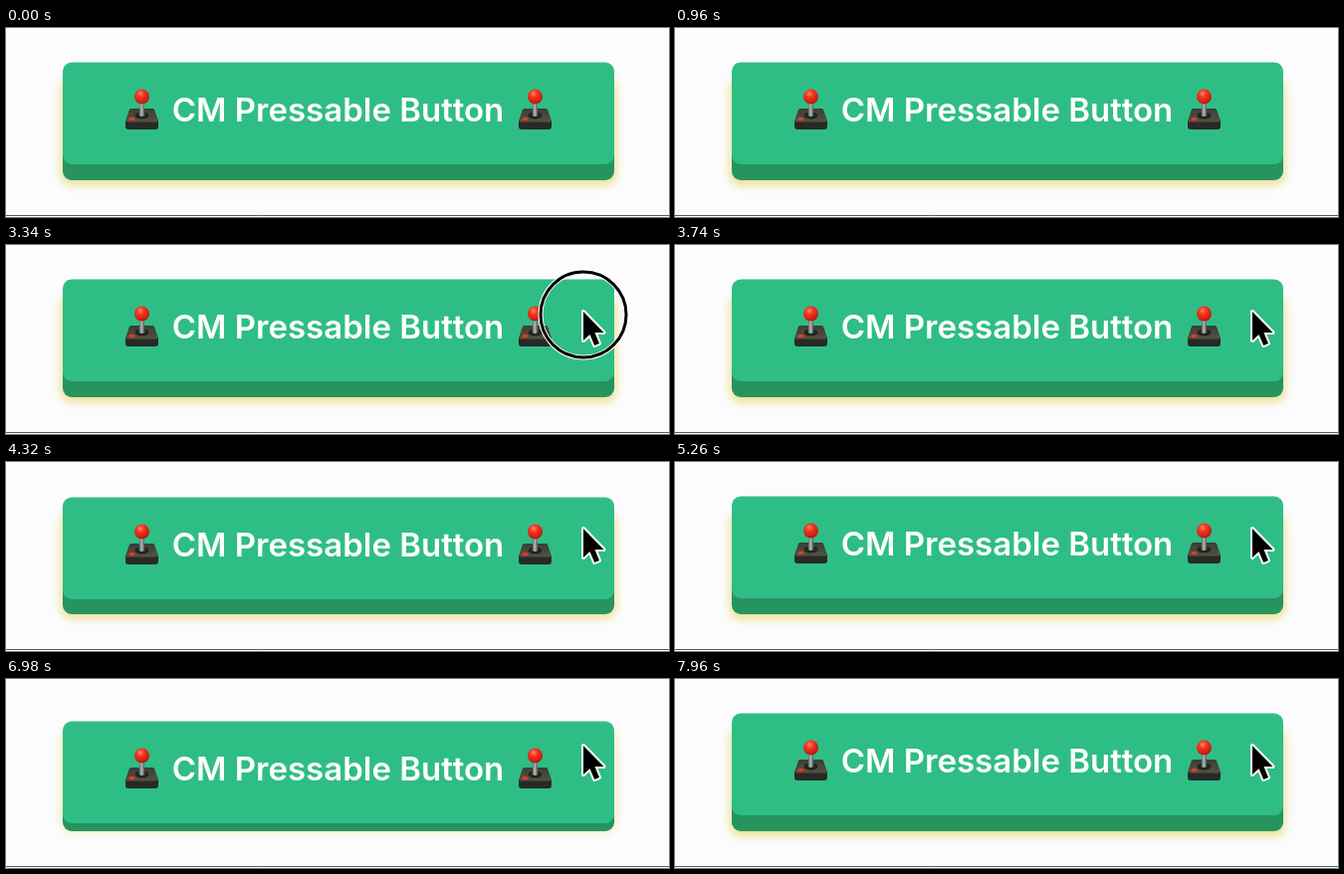
Write an HTML page that moves like this. It is 666 px wide and 190 px high and loops after 8 s.

```html
<!DOCTYPE html>
<html lang="en">
<head>
<meta charset="utf-8">
<title>Pressable button</title>
<style>
  html, body { margin: 0; width: 100%; height: 100%; overflow: hidden; background: #fcfcfe; }
  svg { display: block; width: 666px; height: 190px; }
  text { font: 600 33px Inter, sans-serif; fill: #fff; text-anchor: middle; }
</style>
</head>
<body>
<svg viewBox="0 0 666 190">
  <defs>
    <filter id="blur" x="-10%" y="-30%" width="120%" height="160%"><feGaussianBlur stdDeviation="5"/></filter>
    <radialGradient id="ball" cx=".4" cy=".3" r=".7">
      <stop offset="0" stop-color="#ff8a70"/>
      <stop offset=".35" stop-color="#f8361f"/>
      <stop offset="1" stop-color="#b91710"/>
    </radialGradient>
    <linearGradient id="rod">
      <stop offset="0" stop-color="#4b5151"/>
      <stop offset=".45" stop-color="#b4bcb8"/>
      <stop offset="1" stop-color="#3c4040"/>
    </linearGradient>
    <linearGradient id="deck" x2="0" y2="1">
      <stop offset="0" stop-color="#3a3e35"/>
      <stop offset="1" stop-color="#55533f"/>
    </linearGradient>
    <g id="joystick">
      <path d="M6 20H27Q28.500 20 29 21.500L33 33V38Q33 41 30 41H3Q0 41 0 38V33L4 21.500Q4.500 20 6 20Z" fill="#272a27"/>
      <path d="M6 20H27Q28.500 20 29 21.500L32.500 32Q32.500 33.500 31 33.500H2Q.5 33.500 .5 32L4 21.500Q4.500 20 6 20Z" fill="url(#deck)"/>
      <ellipse cx="16.500" cy="27" rx="7" ry="3.500" fill="#202420"/>
      <path d="M14.700 13H18.300L19.500 27Q16.500 29 13.500 27Z" fill="url(#rod)"/>
      <ellipse cx="6.500" cy="30.500" rx="3" ry="1.700" fill="#e8382a"/>
      <circle cx="16.500" cy="8" r="7.500" fill="url(#ball)"/>
    </g>
  </defs>

  <rect id="shadow" x="55" y="50" width="558" rx="11" fill="#e2d66a" filter="url(#blur)"/>
  <rect x="57" y="80" width="554" height="73" rx="9" fill="#27935f"/>
  <g id="face">
    <rect x="57" y="34.500" width="554" height="102.500" rx="9" fill="#2fbd86"/>
    <text x="333.500" y="94">CM Pressable Button</text>
    <use href="#joystick" x="120" y="61"/>
    <use href="#joystick" x="515" y="61"/>
  </g>
  <path d="M0 188.500H666" stroke="#5c5c4b"/>
  <g id="ring" fill="none">
    <circle cx="580" cy="70" r="43" stroke="#fff" stroke-width="5"/>
    <circle cx="580" cy="70" r="43" stroke="#000" stroke-width="3"/>
  </g>
  <path id="cursor" d="M0 0V29L6.500 23L11.200 34L16 32L11.500 21H20.500Z"
        stroke="#fff" stroke-width="4" stroke-linejoin="round" paint-order="stroke"/>
</svg>
<script>
  const LOOP = 8000, PRESS_DEPTH = 8, LAG = 80, PRESS_TIME = 150, RELEASE_TIME = 200;
  const clicks = [[2720, 2880], [3330, 3480], [3940, 4110], [5400, 6950]];
  // Pointer path: time, x, y
  const path = [[1200, 670, 54], [1660, 624, 49], [1800, 615, 51], [2350, 580, 67]];

  const [shadow, face, ring, cursor] =
    ['shadow', 'face', 'ring', 'cursor'].map(id => document.getElementById(id));
  const easeOut = u => 1 - (1 - Math.min(1, Math.max(0, u))) ** 2;

  function depthAt(t) {
    const click = clicks.findLast(([down]) => t >= down + LAG);
    if (!click) return 0;
    const [down, up] = click.map(time => time + LAG);
    return PRESS_DEPTH * easeOut((t - down) / PRESS_TIME) * (1 - easeOut((t - up) / RELEASE_TIME));
  }

  function pointerAt(t) {
    const next = path.findIndex(([time]) => time > t);
    if (next === 0) return path[0].slice(1);
    if (next < 0) return path.at(-1).slice(1);
    const [t0, x0, y0] = path[next - 1], [t1, x1, y1] = path[next];
    let u = (t - t0) / (t1 - t0);
    if (next === path.length - 1) u = easeOut(u);
    return [x0 + (x1 - x0) * u, y0 + (y1 - y0) * u];
  }

  function draw(now) {
    const t = now % LOOP;
    const depth = depthAt(t), pressed = depth / PRESS_DEPTH;
    face.setAttribute('transform', `translate(0 ${depth})`);
    shadow.setAttribute('height', 108 - 4 * pressed);
    shadow.setAttribute('opacity', 0.75 - 0.25 * pressed);
    ring.setAttribute('visibility', clicks.some(([down, up]) => t >= down && t < up) ? 'visible' : 'hidden');
    cursor.setAttribute('transform', `translate(${pointerAt(t)})`);
    requestAnimationFrame(() => draw(performance.now() - start));
  }

  const start = performance.now();
  draw(0);
</script>
</body>
</html>
```
